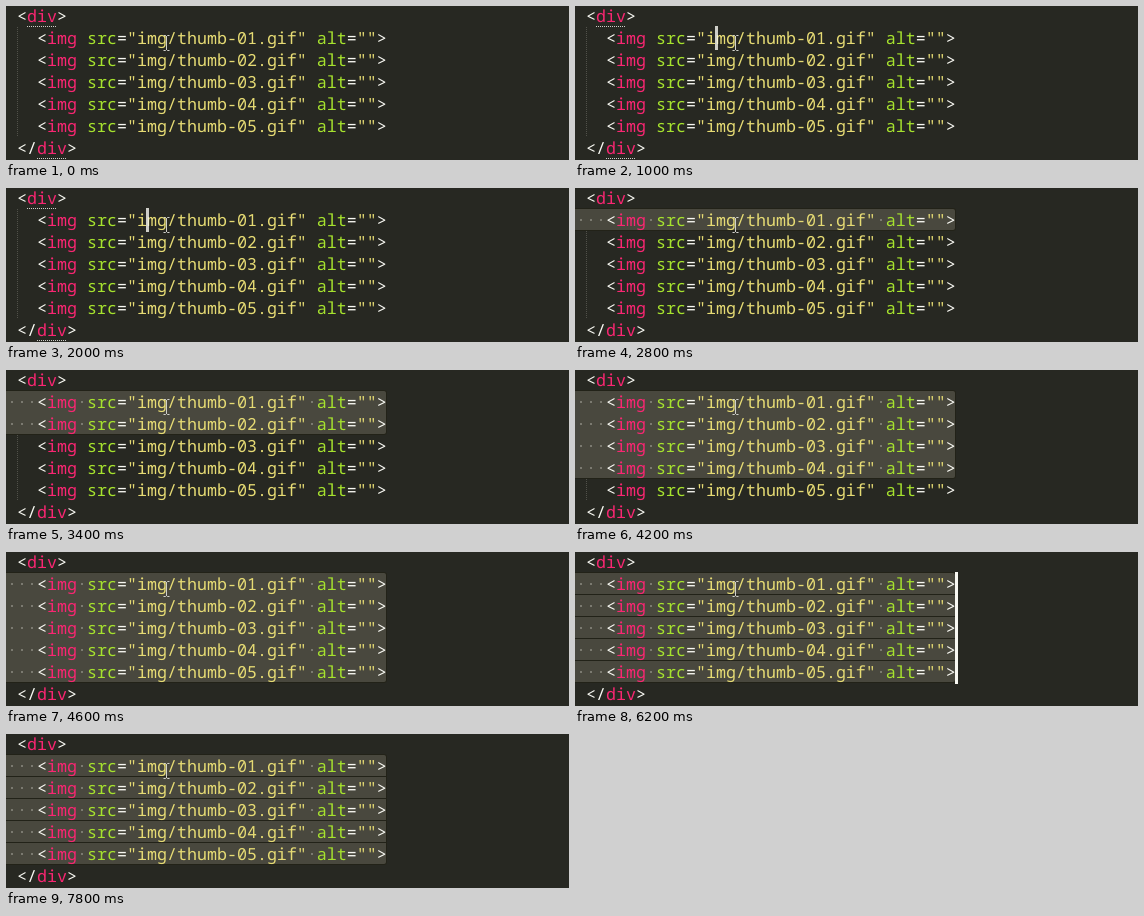
These frames come from a looping animation (563 by 154 pixels, 8 s). An HTML page:

```html
<!DOCTYPE html>
<html lang="en">
<head>
<meta charset="utf-8">
<title>Select and split lines</title>
<style>
  html, body { margin: 0; width: 100%; height: 100%; overflow: hidden; background: #272822; }
  body { position: relative; }
  div, svg { position: absolute; }

  .guide {
    left: 11px; top: 21px; width: 1px; height: 110px;
    background: repeating-linear-gradient(#51514a 0 1px, transparent 1px 2px);
  }

  /* Whitespace dots repeat once per 22px row */
  .selection {
    --dot: linear-gradient(#7b7a70 2px, transparent 0);
    left: 0; top: 20px; width: 381px; box-sizing: border-box; overflow: hidden;
    border: solid #222218; border-width: 1px 1px 1px 0; border-radius: 0 3px 3px 0;
    background:
      var(--dot) 5px 10px / 2px 22px repeat-y,
      var(--dot) 15px 10px / 2px 22px repeat-y,
      var(--dot) 25px 10px / 2px 22px repeat-y,
      var(--dot) 75px 10px / 2px 22px repeat-y,
      var(--dot) 305px 10px / 2px 22px repeat-y,
      #49483e;
    animation: grow 8s step-end infinite;
  }
  .dividers {
    inset: 0;
    background: repeating-linear-gradient(transparent 0 21px, #222218 21px 22px);
    animation: split 8s step-end infinite;
  }

  .code { left: 0; top: 0; }
  text {
    font: 16.6667px "Noto Sans Mono", "DejaVu Sans Mono", monospace;
    text-rendering: geometricPrecision; white-space: pre; fill: #f8f8f2;
  }
  .tag { fill: #f92672; }
  .attr { fill: #a6e22e; }
  .str { fill: #e6db74; }
  .underline { stroke: #f8f8f2; stroke-dasharray: 1 1; animation: match 8s step-end infinite; }
  .pointer { fill: none; stroke: #d0d0cb; }

  .caret { top: 20px; width: 3px; background: #f8f8f2; }
  .single { left: 140px; height: 24px; animation: blink-single 8s step-end infinite; }
  .multi { left: 380px; height: 112px; animation: blink-multi 8s step-end infinite; }

  @keyframes grow {
    0% { height: 0; visibility: hidden; }
    35% { height: 23px; visibility: visible; }
    42.5% { height: 45px; visibility: visible; }
    47.5% { height: 67px; visibility: visible; }
    52.5% { height: 89px; visibility: visible; }
    57.5%, 100% { height: 111px; visibility: visible; }
  }
  @keyframes split { 0% { opacity: 0; } 77.5%, 100% { opacity: 1; } }
  @keyframes match { 0% { opacity: .8; } 35%, 100% { opacity: 0; } }
  @keyframes blink-single {
    0%, 15%, 27.5%, 35%, 100% { opacity: 0; }
    7.5%, 20%, 32.5% { opacity: .5; }
    10%, 22.5% { opacity: 1; }
    12.5%, 25% { opacity: .8; }
  }
  @keyframes blink-multi {
    0%, 87.5%, 97.5%, 100% { opacity: 0; }
    77.5%, 92.5% { opacity: 1; }
    82.5%, 95% { opacity: .95; }
    85%, 90% { opacity: .04; }
  }
</style>
</head>
<body>
<div class="guide"></div>
<div class="selection"><div class="dividers"></div></div>
<svg class="code" width="563" height="154">
  <text x="11" y="16">&lt;<tspan class="tag">div</tspan>&gt;</text>
  <g id="rows"></g>
  <text x="11" y="148">&lt;/<tspan class="tag">div</tspan>&gt;</text>
  <path class="underline" d="M21 20.5h30M31 152.5h30"/>
  <path class="pointer" d="M157.5 29.5h2l1 1 1-1h2M160.5 30v14M157.5 44.5h2l1-1 1 1h2"/>
</svg>
<div class="caret single"></div>
<div class="caret multi"></div>
<script>
  const span = (kind, content) => `<tspan class="${kind}">${content}</tspan>`;
  const imageRow = n =>
    `<text x="31" y="${16 + 22 * n}">&lt;${span('tag', 'img')} ` +
    `${span('attr', 'src')}=${span('str', `"img/thumb-0${n}.gif"`)} ` +
    `${span('attr', 'alt')}=${span('str', '""')}&gt;</text>`;
  document.getElementById('rows').innerHTML = [1, 2, 3, 4, 5].map(imageRow).join('');
</script>
</body>
</html>
```
